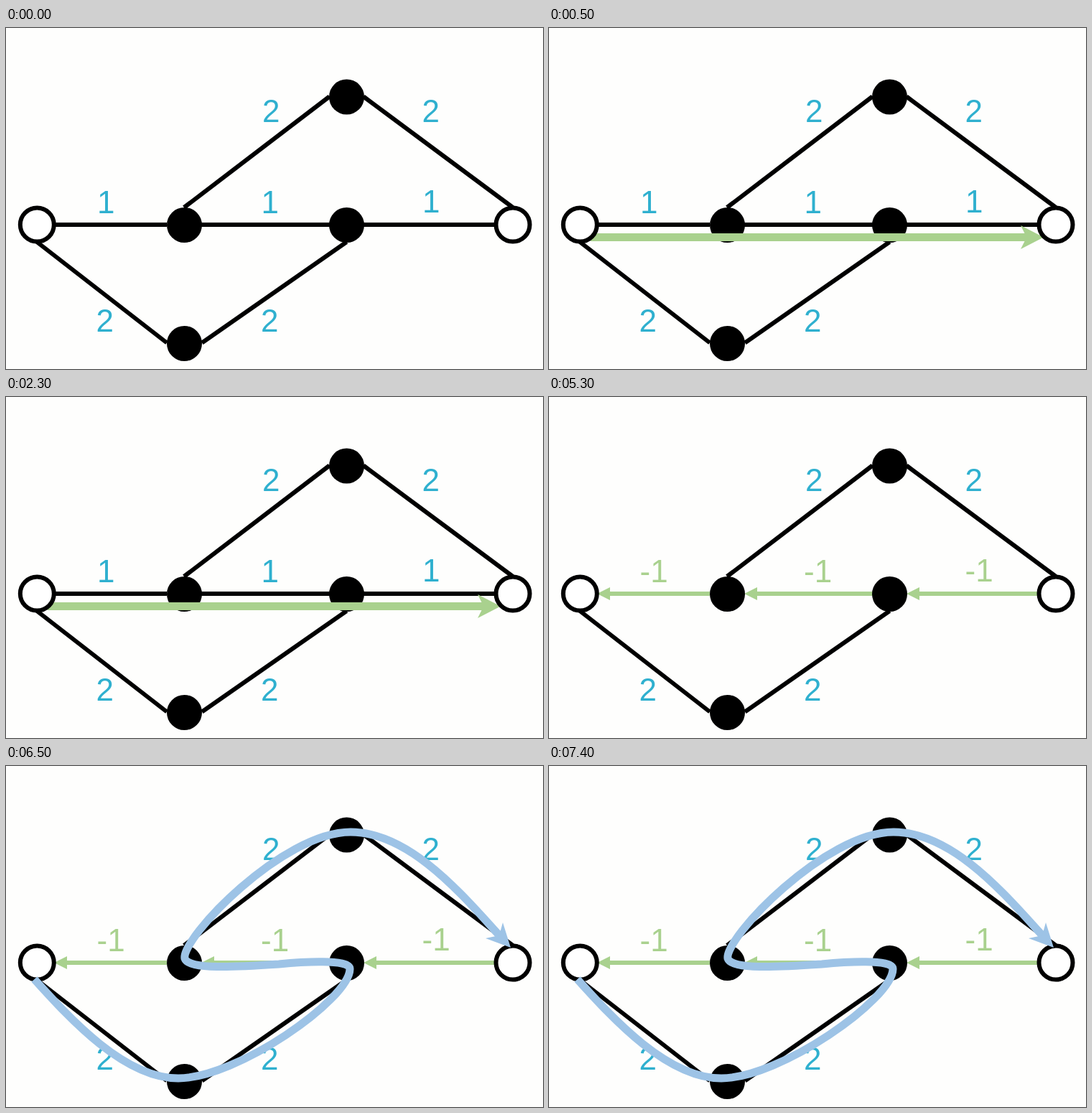
Recreate the animation shown at these times as an HTML page. Size 748 by 475 pixels, loop 8000 ms.

```html
<!DOCTYPE html>
<html lang="en">
<head>
<meta charset="utf-8">
<title>Augmenting paths</title>
<style>
  html, body { margin: 0; width: 100%; height: 100%; overflow: hidden; background: #fefefd; }
  svg { display: block; width: 100vw; height: 100vh; }
  text { font: 44px "Liberation Sans", Arial, sans-serif; }
  .edge { fill: none; stroke: #000; stroke-width: 6; }
  .cost { fill: #2fb0cf; }
  .back { fill: #a9d18e; }
  .back path { fill: none; stroke: #a9d18e; stroke-width: 6; }
  .end { fill: #fff; stroke: #000; stroke-width: 6; }
</style>
</head>
<body>
<svg viewBox="0 0 748 475">
  <path class="edge" d="M248 250L450.500 95.500M498 95.500L706 250M43 298L224 438.500M273 438.500L474.500 298"/>
  <g class="cost">
    <text x="357" y="131">2</text>
    <text x="579.500" y="131">2</text>
    <text x="125.500" y="423">2</text>
    <text x="355" y="423">2</text>
  </g>
  <g id="forward">
    <path class="edge" d="M67 274H224M272 274H451M498 274H682"/>
    <g class="cost" id="ones"></g>
  </g>
  <g id="residual" class="back"></g>
  <g id="nodes">
    <circle cx="474.500" cy="96" r="24.500"/>
    <circle cx="248.500" cy="274.500" r="24.500"/>
    <circle cx="474.500" cy="274.500" r="24.500"/>
    <circle cx="248.500" cy="439.500" r="24.500"/>
  </g>
  <g id="direct" fill="#a9d18e">
    <path d="M58 286H662.500L657 275L689 291.500L657 308L662.500 297H58Z"/>
  </g>
  <circle class="end" cx="43.300" cy="274" r="23.500"/>
  <circle class="end" cx="706" cy="274" r="23.500"/>
  <g id="detour">
    <path fill="none" stroke="#9dc3e6" stroke-width="11"
      d="M39.500 297C90 353 165 435 240 435C322 435 478 325 479 283C480 268 410 273 380 276C320 280 254 284 249 268C244 240 385 92 480 92C565 92 640 185 690 239"/>
    <path fill="#9dc3e6" d="M703 253L668 240L687 236L692 218Z"/>
  </g>
</svg>
<script>
  const LOOP = 8000;
  const byId = id => document.getElementById(id);

  // Each hop of the middle route: arrow tip, line end, label position
  const hops = [
    { tip: 67, end: 224, x: 126.5, y: 258 },
    { tip: 272, end: 451, x: 355, y: 258 },
    { tip: 498, end: 681, x: 579.5, y: 257 }
  ];
  byId("ones").innerHTML = hops.map(h =>
    `<text x="${h.x + 0.5}" y="${h.y}">1</text>`).join("");
  byId("residual").innerHTML = hops.map(h =>
    `<path d="M${h.tip + 16} 274H${h.end}"/>
     <polygon points="${h.tip},274 ${h.tip + 18},265 ${h.tip + 18},283"/>
     <text x="${h.x}" y="${h.y}">-1</text>`).join("");

  // Visible time span of each layer, in ms
  const spans = {
    forward: [0, 3500],
    direct: [500, 3500],
    residual: [3500, LOOP],
    detour: [6500, LOOP]
  };

  function draw(t) {
    for (const [id, [from, to]] of Object.entries(spans)) {
      byId(id).style.display = t >= from && t < to ? "" : "none";
    }
  }

  const start = performance.now();
  function tick() {
    draw((performance.now() - start) % LOOP);
    requestAnimationFrame(tick);
  }
  tick();
</script>
</body>
</html>
```
